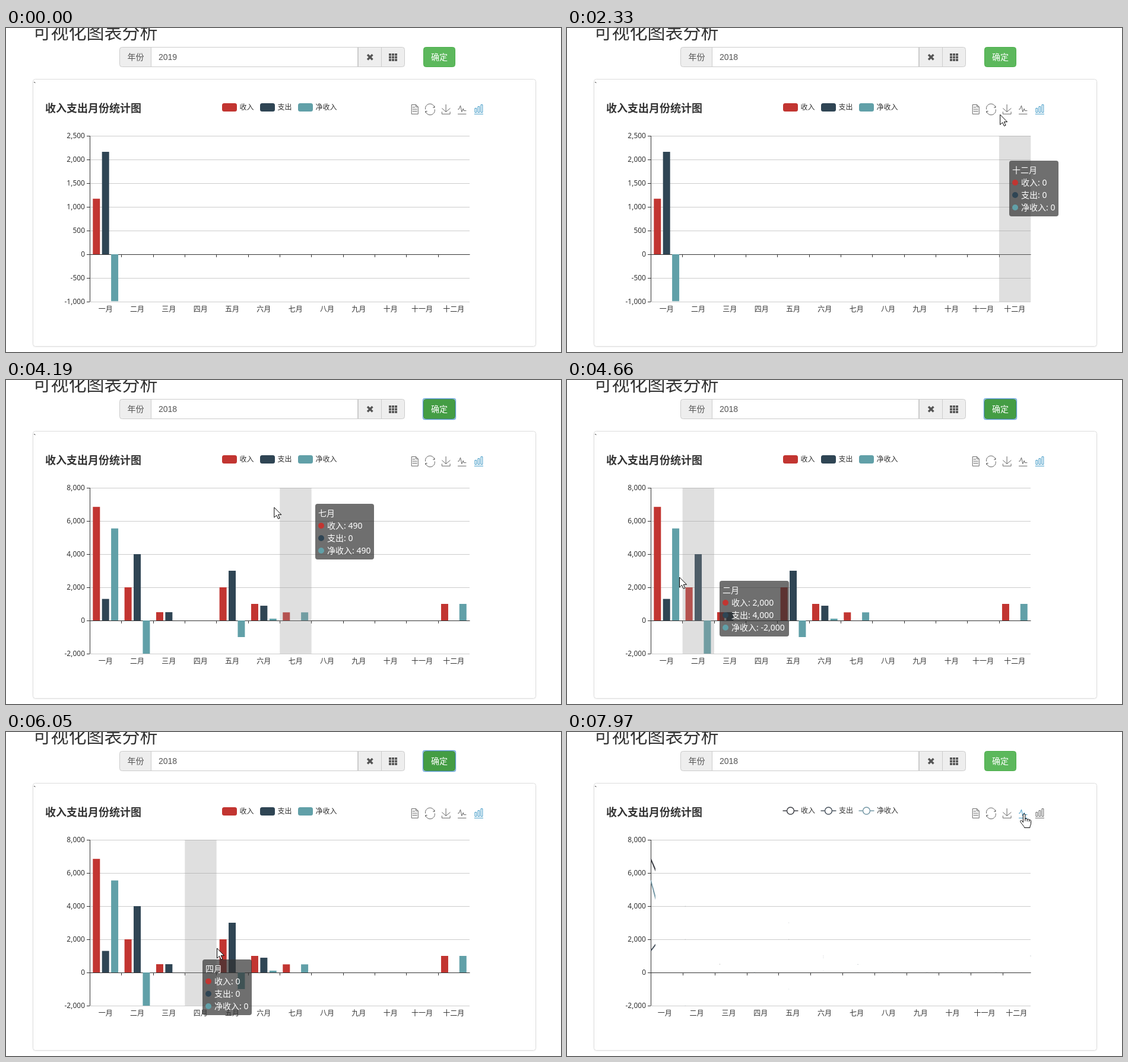
An HTML page that plays this animation: 935 px wide and 547 px high, repeating every 8000 ms.

```html
<!DOCTYPE html>
<html lang="zh-CN">
<head>
<meta charset="utf-8">
<title>可视化图表分析</title>
<style>
html, body { margin: 0; width: 100%; height: 100%; overflow: hidden; background: #fff; }
svg { display: block; font: 12px "Noto Sans", "Noto Sans CJK SC", "Noto Sans CJK", sans-serif; fill: #333; }
.ui { font: 14px "Liberation Sans", "Noto Sans CJK SC", "Noto Sans CJK", sans-serif; }
.b { font-weight: bold; }
.mid { text-anchor: middle; }
.end { text-anchor: end; }
</style>
</head>
<body>
<svg id="stage" width="935" height="547" viewBox="0 0 935 547"></svg>
<script>
const LOOP = 8000, STEP = 78;
const COLORS = ['#c23531', '#2f4554', '#61a0a8'];
const LINE_COLORS = ['#3f4147', '#4a545f', '#7598a6'];
const SERIES = ['收入', '支出', '净收入'];
const MONTHS = '一二三四五六七八九十'.split('').concat('十一', '十二').map(m => m + '月');
const LEFT = 141, TOP = 182, BOTTOM = 462, WIDTH = 640, BAND = WIDTH / 12;
const BLUE = '#3e98c5';

// income and spending by month index
const YEAR_A = { 0: [1172, 2162] };
const YEAR_B = { 0: [6850, 1300], 1: [2000, 4000], 2: [500, 500], 4: [2000, 3000], 5: [1000, 890],
  6: [490, 0], 11: [1000, 0] };
const values = (year, m) => { const [a, b] = year[m] || [0, 0]; return [a, b, a - b]; };

// moments of the story
const OPEN = 1000, PICK = 1945, PRESS = 3025, UPDATE = 3106, GROW = 3212, BLUR = 7805, SWITCH = 7885;
const CLICKS = [920, 1865, 2945, BLUR];

// bursts of screen updates: start, end
const BURSTS = [[370, 1080], [1240, 2030], [2100, 2720], [2950, 3730], [3800, 4580],
  [4660, 5430], [5510, 6280], [6350, 7120], [7200, 7580], [7810, 7970]];

// pointer path: time, x, y
const PATH = [
  [370, 922, 394], [528, 885, 240], [686, 780, 110], [843, 652, 50], [1240, 652, 52], [1640, 690, 180],
  [1793, 668, 247], [1872, 668, 247], [1951, 680, 246], [2100, 700, 232], [2255, 733, 195], [2490, 723, 47],
  [3800, 718, 55], [4114, 500, 190], [4502, 254, 318], [4580, 215, 327], [4660, 189.5, 333], [4738, 165, 340],
  [5430, 174, 350], [5664, 215, 358], [5972, 326.5, 365], [6049, 355.5, 365], [6203, 410, 367],
  [6350, 452, 370], [6581, 640, 372], [6650, 728, 372], [6690, 738, 372], [6735, 800, 372],
  [6966, 841.5, 362], [7043, 856, 260], [7120, 839, 178], [7430, 780, 138], [7505, 770, 138]];

const columns = [23, 13, 2].map((y, i) => `M${7 + 18 * i} ${y}h10V48h-10z`).join('');
const rules = [17, 29, 41].map((y, i) => `M17 ${y}h${i ? 28 : 16}`).join('');
const ICONS = [
  { x: 680, d: 'M11.5 2v56H51V15L38 2zM38 2v13h13' + rules },
  { x: 706, d: 'M57 19A28 28 0 0 0 2 30M47 19h10V9M13 41H3v10M3 41A28 28 0 0 0 58 30' },
  { x: 733, d: 'M5 23l24 22 26-22M5 44v14h49V44M29 45V0' },
  { x: 760, d: 'M4 29h7l9-22 8 38 9-20 3 13h15M4 58h51', label: '切换为折线图' },
  { x: 788, d: columns + 'M3 58h54', label: '切换为柱状图' }];
const ARROW = 'M0 0V17l4-3.7 2.8 6 2.6-1.2-2.7-5.8H12z';
const HAND = 'M0 0q1.8 0 1.8 2v6.5q3.2-.9 3.5.8 3-.8 3.3 1 3-.5 3 1.8v4.5c0 2.5-1.8 3.5-1.8 7H.5c0-2.5-5-6.5-6.6-10.3-.7-2 1.7-2.7 2.9-1l1.6 2.2V2q0-2 1.6-2zM1.8 8v4.5M5.3 9v4M8.6 10v3.5';

const clamp = v => Math.max(0, Math.min(1, v));
const cubicOut = p => 1 - (1 - clamp(p)) ** 3;
const mix = (a, b, p) => a + (b - a) * p;
const list = (n, fn) => Array.from({ length: n }, (_, i) => fn(i)).join('');
const text = (x, y, s, more = '') => `<text x="${x}" y="${y}" ${more}>${s}</text>`;
const rect = (x, y, w, h, fill, more = '') =>
  `<rect x="${x}" y="${y}" width="${w}" height="${h}" fill="${fill}" ${more}/>`;
const path = (d, more) => `<path d="${d}" ${more}/>`;
const stroke = (d, color, more = '') => path(d, `fill="none" stroke="${color}" ${more}`);
const dot = (x, y, r, fill, more = '') => `<circle cx="${x}" cy="${y}" r="${r}" fill="${fill}" ${more}/>`;
const thousands = n => String(n).replace(/\B(?=(\d{3})+$)/, ',');

function snap(t) {
  const burst = BURSTS.filter(b => b[0] <= t).pop();
  if (!burst) return 0;
  const [start, end] = burst, steps = Math.round((end - start) / STEP), d = (end - start) / steps;
  return start + d * Math.min(steps, Math.floor((t - start) / d + 0.16));
}

function pointer(t) {
  const i = PATH.findIndex(k => k[0] > t);
  if (i < 1) return (i ? PATH[PATH.length - 1] : PATH[0]).slice(1);
  const [a, b] = [PATH[i - 1], PATH[i]], p = (t - a[0]) / (b[0] - a[0]);
  return [mix(a[1], b[1], p), mix(a[2], b[2], p)];
}

function hover(t) {
  const [x, y] = pointer(t);
  const inside = t > PICK && t < SWITCH && x > LEFT && x < LEFT + WIDTH && y > TOP && y < BOTTOM;
  return inside ? Math.floor((x - LEFT) / BAND) : -1;
}

const yearAt = t => t < UPDATE ? YEAR_A : YEAR_B;

function tipWidth(vals) {
  const w = vals.map((v, i) => {
    const s = thousands(v), digits = s.replace(/\D/g, '').length;
    return SERIES[i].length * 14 + 7.4 + digits * 8.2 + s.includes(',') * 3.8 + (v < 0) * 6;
  });
  return Math.round(25 + Math.max(...w));
}

// the tooltip trails the pointer and lingers after it has left the grid
function tooltip(t) {
  let tip = null;
  for (let j = 10; j >= 0; j--) {
    const at = t - STEP * (j + 1), m = hover(at);
    if (m >= 0) {
      const [px, py] = pointer(at), vals = values(yearAt(at), m), w = tipWidth(vals);
      const tx = px + 20 + w > 850 ? px - 20 - w : px + 20, ty = py + 20;
      tip = { x: tx, y: ty, ...(tip && { x: tip.x, y: tip.y }), tx, ty, m, vals, w, age: 0 };
    } else if (tip && ++tip.age > 3) tip = null;
    if (tip) {
      tip.x = mix(tip.x, tip.tx, 0.65);
      tip.y = mix(tip.y, tip.ty, 0.65);
    }
  }
  return tip;
}

function drawTooltip(t) {
  const tip = tooltip(t);
  if (!tip) return '';
  const x = Math.round(tip.x), y = Math.round(tip.y);
  return (tip.age ? '' : rect(LEFT + tip.m * BAND + 0.3, TOP, BAND, BOTTOM - TOP, '#969696', 'opacity=".3"')) +
    rect(x, y, tip.w, 94, '#323232', 'rx="4" opacity=".7"') +
    `<g style="font-size:14px" fill="#fff">${text(x + 5, y + 21, MONTHS[tip.m])}` +
    list(3, i => dot(x + 10, y + 37 + 21 * i, 5, COLORS[i]) +
      text(x + 20, y + 42 + 21 * i, `${SERIES[i]}: ${thousands(tip.vals[i])}`)) + '</g>';
}

function drawForm(t, x, y) {
  const focus = t >= OPEN && t < PICK, pressed = t >= PRESS && t < BLUR;
  const over = t > 370 && t < BLUR && x > 703 && x < 757 && y > 32 && y < 66;
  const dark = pressed || over;
  return rect(191.5, 32.5, 480, 33, '#eee', 'rx="4" stroke="#ccc"') +
    text(204.5, 54, '年份', 'class="ui" fill="#555"') +
    rect(244.5, 32.5, 348, 33, '#fff', focus
      ? 'stroke="#66afe9" style="filter:drop-shadow(0 0 3px #66afe999)"' : 'stroke="#ccc"') +
    text(257, 54, t < PICK ? 2019 : 2018, 'class="ui" fill="#555"') +
    stroke('M593.5 33v33M632.5 33v33', '#ccc') +
    stroke('M609 45l8.5 8.5M617.5 45l-8.5 8.5', '#555', 'stroke-width="3.4"') +
    list(9, i => rect(645 + i % 3 * 5, 43 + Math.floor(i / 3) * 4.6, 4, 3.7, '#555')) +
    rect(703.5, 32.5, 53, 33, dark ? '#449d44' : '#5cb85c', `rx="4" stroke="${dark ? '#398439' : '#4cae4c'}"`) +
    (pressed ? rect(702.5, 31.5, 55, 35, 'none', 'rx="3" stroke="#6aa5dc" stroke-width="1.4"') : '') +
    text(716, 54, '确定', 'class="ui" fill="#fff"');
}

function drawAxes(t, isLine, q) {
  const p = cubicOut((t - UPDATE) / 300), fresh = t >= UPDATE;
  const top = fresh ? 8000 : 2500, gap = fresh ? 2000 : 500, n = fresh ? 6 : 8;
  const zero = Math.round(fresh ? mix(382, 406, p) : 382);
  const shift = isLine ? 0.11 * q : 0, wide = WIDTH / 11;
  const rows = list(n, i => {
    const v = top - i * gap;
    let y = TOP + i * 280 / (n - 1);
    if (fresh && v === 0) y = zero;
    if (fresh && v === 2000) y = Math.round(mix(222, 350, p));
    return (v ? stroke(`M141 ${y + 0.5}H781`, '#ccc') : '') + stroke(`M136 ${y + 0.5}h5`, '#333') +
      text(133, y + 3.5, thousands(v), 'class="end"');
  });
  const cols = list(12, i =>
    stroke(`M${Math.round(LEFT + mix(BAND, wide, shift) * i) + 0.5} ${zero}v5`, '#333') +
    text(LEFT + mix((i + 0.5) * BAND, i * wide, shift), 479, MONTHS[i], 'class="mid"'));
  return rows + cols + stroke(`M141.5 182V462M141 ${zero + 0.5}H781.5`, '#333');
}

function drawBars(t) {
  const fresh = t >= UPDATE, p = cubicOut((t - UPDATE) / 300), grow = cubicOut((t - GROW) / 1000);
  return list(12, m => {
    const old = values(YEAR_A, m), now = values(YEAR_B, m);
    return list(3, s => {
      let base = 382, h = old[s] * 0.08;
      if (fresh) {
        base = m ? 406 : mix(382, 406, p);
        h = m ? now[s] * 0.028 * grow : mix(h, now[s] * 0.028, p);
      }
      return h ? rect(LEFT + 5.3 + m * BAND + s * 15.4, Math.min(base, base - h), 12, Math.abs(h), COLORS[s]) : '';
    });
  });
}

function drawLines(q) {
  const w = WIDTH / 11;
  return `<clipPath id="sweep">${rect(LEFT, 170, 8 * q, 300, '#000')}</clipPath>` + list(3, s => {
    const pts = MONTHS.map((_, m) => [LEFT + m * w, 406 - values(YEAR_B, m)[s] * 0.028]);
    return stroke('M' + pts.join('L'), LINE_COLORS[s], 'stroke-width="2" clip-path="url(#sweep)"') +
      pts.map(([x, y]) => dot(x, y, 0.5 * q, LINE_COLORS[s], 'opacity=".4"')).join('');
  });
}

function drawLegend(isLine) {
  return list(3, i => {
    const x = 364 + 64 * i, c = LINE_COLORS[i];
    return isLine
      ? stroke(`M${x - 0.5} 133h26`, c, 'stroke-width="1.5"') +
        dot(x + 12.5, 133, 6, '#fff', `stroke="${c}" stroke-width="1.5"`) + text(x + 30, 136.5, SERIES[i])
      : rect(x, 127, 25, 14, COLORS[i], 'rx="3.5"') + text(x + 29.5, 137.5, SERIES[i]);
  });
}

const iconAt = (x, y) => y > 127 && y < 149 ? ICONS.findIndex(i => Math.abs(x - i.x - 8.4) < 9) : -1;

function drawIcons(isLine, hot) {
  return ICONS.map(({ x, d, label }, i) => {
    const on = i === hot || i === (isLine ? 3 : 4);
    return stroke(d, on ? BLUE : '#666',
      `transform="translate(${x} 129) scale(.28)" vector-effect="non-scaling-stroke"`) +
      (i === hot && label && !isLine ? text(x + 8.4, 160, label, `class="mid" fill="${BLUE}"`) : '');
  }).join('');
}

function drawPicker(x, y) {
  const cells = list(12, i => {
    const cx = 605 + i % 4 * 45.7, cy = 109 + Math.floor(i / 4) * 57.5, year = 2009 + i, active = year === 2019;
    const over = x > cx && x < cx + 42 && y > cy && y < cy + 54;
    const fill = active ? 'url(#active)' : over ? '#eee' : 'none';
    return rect(cx, cy, 42, 54, fill, 'rx="4"') +
      text(cx + 21, cy + 32, year, `class="mid${active ? ' b' : ''}" ${active ? 'fill="#fff"' : ''}`);
  });
  return `<linearGradient id="active" x2="0" y2="1"><stop stop-color="#08c"/><stop offset="1" stop-color="#04c"/></linearGradient>
    <g class="ui">` +
    rect(594, 68, 202, 252, '#fff', 'rx="4" stroke="#bbb" style="filter:drop-shadow(0 6px 6px #0003)"') +
    path('M600.5 68.6l6.5-6.5 6.5 6.5', 'fill="#fff" stroke="#ccc"') +
    path('M604 86.5l6-6v4h7.5v4h-7.5v4zM786 86.5l-6-6v4h-7.5v4h7.5v4z', '') +
    text(695, 92, '2010-2019', 'class="mid b"') + cells + text(695, 305, '今天', 'class="mid b"') + '</g>';
}

function drawPointer(t, x, y, hand) {
  if (t < 370) return '';
  const click = CLICKS.some(c => t >= c && t < c + 80);
  return (click ? dot(x, y, 12, '#f4ec1e', 'opacity=".7"') : '') +
    path(hand ? HAND : ARROW, `transform="translate(${x} ${y})" fill="#fff" stroke="#000" stroke-linejoin="round"`);
}

function draw(t) {
  const [x, y] = pointer(t), isLine = t >= SWITCH, q = clamp((t - 7890) / 80);
  const open = t >= OPEN && t < PICK, hot = t > 7000 ? iconAt(x, y) : -1;
  const onForm = y > 31 && y < 67 && x > 593 && x < 757;
  const onPicker = open && x > 594 && x < 796 && y < 320;
  return text(45.5, 18, '可视化图表分析', 'style="font-size:30px"') +
    drawForm(t, x, y) +
    rect(45.5, 86.5, 847, 451, '#fff', 'rx="4" stroke="#ddd" style="filter:drop-shadow(0 1px 1px #0000000d)"') +
    text(46, 102, '`', 'class="ui"') +
    text(66, 141.5, '收入支出月份统计图', 'class="b" style="font-size:18px"') +
    drawLegend(isLine) + drawIcons(isLine, hot) + drawAxes(t, isLine, q) +
    (isLine ? drawLines(q) : drawBars(t) + drawTooltip(t)) +
    (open ? drawPicker(x, y) : '') +
    drawPointer(t, x, y, onForm || onPicker || hot >= 0);
}

const stage = document.getElementById('stage');
const begin = performance.now();
let shown = -1;
function frame() {
  const t = snap((performance.now() - begin) % LOOP);
  if (t !== shown) stage.innerHTML = draw(shown = t);
  requestAnimationFrame(frame);
}
frame();
</script>
</body>
</html>
```
